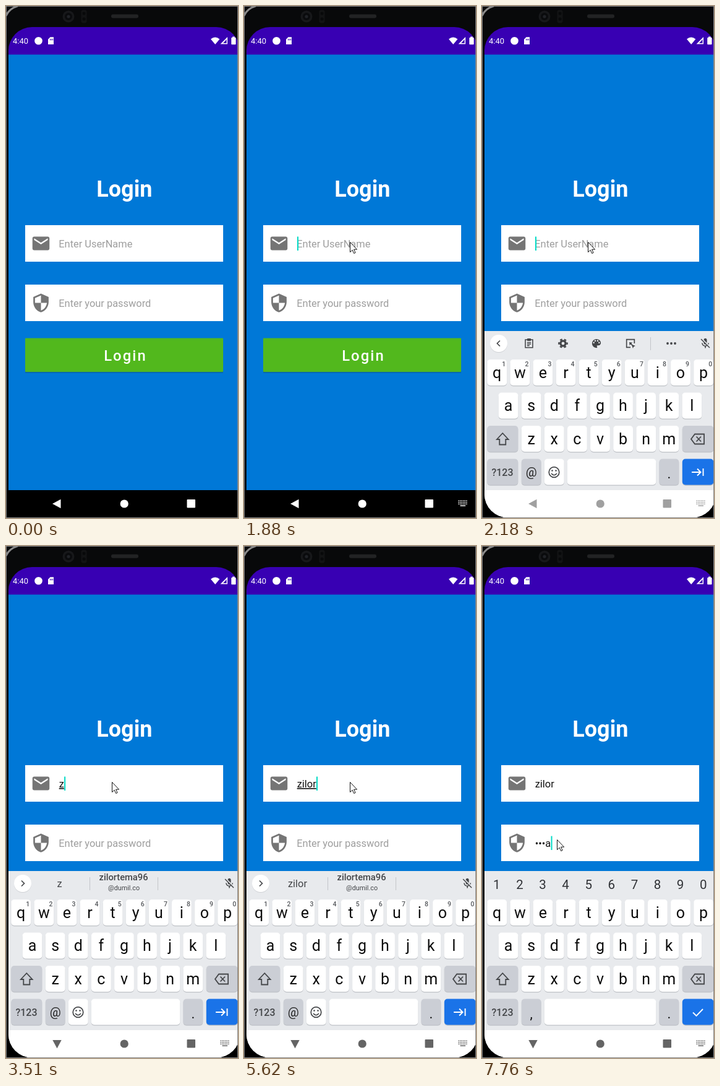
Write an HTML page that moves like this. It is 375 px wide and 827 px high and loops after 8000 ms.

```html
<!DOCTYPE html>
<html lang="en">
<head>
<meta charset="utf-8">
<title>Login screen</title>
<style>
  html, body { margin: 0; width: 100%; height: 100%; overflow: hidden; background: #000; }
  svg { display: block; width: 375px; height: 827px; font-family: Roboto, sans-serif; }
  text { white-space: pre; }
</style>
</head>
<body>
<svg id="stage" viewBox="0 0 375 827" xmlns="http://www.w3.org/2000/svg"></svg>
<script>
const LOOP = 8000;
const INK = '#444649', KEY = '#fff', SOFT = '#cbced5', BLUE = '#1a73e8';

// Markup helpers
const rect = (x, y, w, h, fill, r = 0) =>
  `<rect x="${x}" y="${y}" width="${w}" height="${h}" rx="${r}" fill="${fill}"/>`;
const text = (x, y, size, fill, str, extra = '') =>
  `<text x="${x}" y="${y}" font-size="${size}" fill="${fill}" ${extra}>${str}</text>`;
const mid = (x, y, size, fill, str, extra = '') =>
  text(x, y, size, fill, str, `text-anchor="middle" ${extra}`);
const circle = (x, y, r, fill) => `<circle cx="${x}" cy="${y}" r="${r}" fill="${fill}"/>`;
const line = (d, width = 1.8, color = INK) =>
  `<path d="${d}" fill="none" stroke="${color}" stroke-width="${width}"/>`;
const layer = (id, body) => `<g id="${id}">${body}</g>`;
// 24-unit icon centred on a point
const icon = (cx, cy, size, body) =>
  `<g transform="translate(${cx - size / 2} ${cy - size / 2}) scale(${size / 24})">${body}</g>`;
const shape = (d, fill = INK) => `<path d="${d}" fill="${fill}" fill-rule="evenodd"/>`;

const MAIL = 'M20 4H4C2.9 4 2 4.9 2 6V18C2 19.1 2.9 20 4 20H20C21.1 20 22 19.1 22 18V6C22 4.9 21.1 4 20 4ZM20 8L12 13 4 8V6L12 11 20 6Z';
const SHIELD = 'M12 1L3 5v6c0 5.55 3.84 10.74 9 12 5.16-1.26 9-6.45 9-12V5ZM12 12h7c-.53 4.12-3.28 7.79-7 8.94V12H5V6.3l7-3.11Z';
const MIC_OFF = 'M19 11h-1.7c0 .74-.16 1.43-.43 2.05l1.23 1.23c.56-.98.9-2.09.9-3.28zM14.98 11.17L15 11V5c0-1.66-1.34-3-3-3S9 3.34 9 5v.18zM4.27 3L3 4.27l6.01 6.01V11c0 1.66 1.33 3 2.99 3l.65-.08 1.66 1.66c-.71.33-1.5.52-2.31.52-2.76 0-5.3-2.1-5.3-5.1H5c0 3.41 2.72 6.23 6 6.72V21h2v-3.28c.91-.13 1.77-.45 2.54-.9L19.73 21 21 19.73z';

const icons = {
  search: '<circle cx="9.5" cy="9.5" r="5.5" fill="none" stroke="#444649" stroke-width="2.2"/>' + line('M13.7 13.7L20 20', 2.4),
  sticker: line('M13 20H6Q4 20 4 18V6Q4 4 6 4H18Q20 4 20 6V13ZM13 20V15Q13 13 15 13H20M8 12Q9 15 12 15', 2)
    + circle(9, 8.8, 1.4, INK) + circle(15, 8.8, 1.4, INK),
  clipboard: line('M4.5 4.5H19.5V20.5H4.5ZM8 10H16M8 13.3H16M8 16.6H13', 2) + rect(8, 2, 8, 5, INK, 1.5),
  gear: '<circle cx="12" cy="12" r="5.2" fill="none" stroke="#444649" stroke-width="4.2"/>'
    + '<circle cx="12" cy="12" r="8.4" fill="none" stroke="#444649" stroke-width="3" stroke-dasharray="4.6 4.2" stroke-dashoffset="2.3"/>',
  palette: shape('M12 3C7 3 3 7 3 12S7 21 12 21C14 21 14 19.5 13 18.3 12.3 17 13 16 14.3 16H16C18.8 16 21 13.8 21 11 21 6.6 17 3 12 3Z')
    + [[6.5, 10.5], [9.5, 6.5], [14.5, 6.5], [17.5, 10.5]].map(([x, y]) => circle(x, y, 1.6, '#e8eaed')).join(''),
  resize: line('M12 20H4V4H20V12M10 10L15 15', 2.1) + shape('M10 10H16L10 16ZM14 14L22 17 18.5 18.5 17 22Z'),
};
const strip = list => list.map((name, i) => name === 'gif'
  ? mid(185, 550, 12.5, INK, 'GIF', 'font-weight="900"')
  : icon([76, 131, 185, 240][i], 545, 19, icons[name])).join('');
const rule = x => rect(x, 535, 1, 21, '#c3c5c9');

// Keyboard
const PITCH = 37.1;
const key = (x, y, w, fill = KEY) =>
  rect(x, y + 1.2, w, 42, '#bfc2c7', 5) + rect(x, y, w, 42, fill, 5);
const keyRow = (letters, x0, y) => [...letters].map((c, i) => {
  const x = x0 + i * PITCH;
  return key(x, y, 31.8) + mid(x + 15.9, y + 29.5, 25, '#0c0c0c', c);
}).join('');
const digits = fn => [...'1234567890'].map((d, i) => fn(d, 8.3 + i * PITCH)).join('');

function keyboard() {
  const common = rect(0, 525, 380, 320, '#e8eaed')
    + keyRow('qwertyuiop', 8.3, 571) + keyRow('asdfghjkl', 26.6, 624.5) + keyRow('zxcvbnm', 63.8, 678)
    + key(8.3, 678, 50, SOFT) + line('M33.3 690L24 700H28.3V708.5H38.3V700H42.6Z')
    + key(323.8, 678, 50.5, SOFT) + line('M344 691.5H359V707.5H344L338 699.5ZM346.5 695.5L354 703.5M354 695.5L346.5 703.5')
    + key(8.3, 731.5, 50, SOFT) + mid(33, 758.5, 16, INK, '?123', 'font-weight="500"')
    + key(286.5, 731.5, 31.8, SOFT) + mid(302.4, 763, 22, '#111', '.')
    + key(323.8, 731.5, 50.5, BLUE);
  const textKeys = digits((d, x) => mid(x + 27, 581.5, 10.5, '#55585c', d, 'font-weight="500"'))
    + key(63.8, 731.5, 31.8, SOFT) + mid(79.7, 760, 20, '#222', '@')
    + key(100.9, 731.5, 31.8) + `<circle cx="116.5" cy="753" r="8.3" fill="none" stroke="${INK}" stroke-width="1.7"/>`
    + circle(113.5, 750.5, 1.3, INK) + circle(119.5, 750.5, 1.3, INK) + line('M112 755Q116.5 760.5 121 755', 1.7)
    + key(137.8, 731.5, 143.5)
    + line('M339 753H353M348 747.5L353.5 753 348 758.5M357.5 747V759', 1.9, '#fff')
    + icon(361, 545, 20, shape(MIC_OFF));
  const passKeys = digits((d, x) => mid(x + 15.5, 553.5, 20.5, '#303236', d))
    + key(63.8, 731.5, 31.8, SOFT) + mid(79.7, 763, 22, '#111', ',')
    + key(100.9, 731.5, 180.4)
    + line('M341 753.5L346.5 759 357 748', 1.9, '#fff');
  const chip = rect(13, 532, 28, 28, '#cfd1d5', 14) + circle(27, 545, 14, '#fff');
  const tools = chip + line('M29 540.5L24.5 545 29 549.5', 1.7)
    + layer('toolsA', strip(['search', 'sticker', 'gif', 'clipboard']))
    + layer('toolsB', strip(['clipboard', 'gear', 'palette', 'resize']))
    + rule(272) + [300, 306, 312].map(x => circle(x, 545, 1.9, INK)).join('');
  const hints = chip + line('M25 540.5L29.5 545 25 549.5', 1.7)
    + mid(86.5, 551, 16.4, INK, '', 'id="guess"') + rule(135) + rule(245)
    + mid(190, 540, 14.7, INK, 'zilortema96', 'font-weight="500"')
    + mid(190.5, 556, 10.8, INK, '@dumil.co');
  return common + layer('textKeys', textKeys + layer('tools', tools) + layer('hints', hints)) + layer('passKeys', passKeys);
}

function statusBar() {
  return rect(4, 34, 374, 44.5, '#3800b3') + text(11, 61, 13, '#fff', '4:40')
    + circle(52.5, 56.3, 6.3, '#fff')
    + shape('M71.5 50.3H77V62H68V54ZM71 53V55.5H72V53ZM73 53V55.5H74V53ZM75 53V55.5H76V53Z', '#fff')
    + shape('M331 53.5Q338 47.5 345.3 53.5L338.2 62Z', '#fff')
    + shape('M358 50V61.5H346.5ZM356.5 54L351 60H356.5Z', '#fff')
    + rect(364.2, 51, 7.3, 11.3, '#fff', 1) + rect(366, 49.5, 3.7, 2, '#fff');
}

function field(y, path, id, hint) {
  return rect(31, y, 320, 59, '#fff')
    + icon(56.5, y + 29.5, 33, shape(path, '#757575'))
    + text(85.3, y + 36, 16.4, '#9e9e9e', hint, `id="${id}Hint"`)
    + text(85.7, y + 36, 16.4, '#111', '', `id="${id}Text"`)
    + `<rect id="${id}Caret" y="${y + 18.5}" width="2" height="22.5" fill="#03dac5"/>`;
}

function keypadIcon() {
  let dots = '';
  for (let r = 0; r < 3; r++)
    for (let c = 0; c < 6; c++) dots += `<rect x="${346.5 + c * 2.5}" y="${798.5 + r * 2.6}" width="1.5" height="1.5"/>`;
  return dots + '<rect x="349.5" y="806.5" width="8.5" height="1.5"/>';
}

const stage = document.getElementById('stage');
stage.innerHTML = '<defs><clipPath id="screen"><rect x="4" y="34" width="374" height="792.5" rx="38"/></clipPath></defs>'
  + rect(0, 0, 375, 827, '#000') + rect(0, 0, 375, 76, '#08090a')
  + line('M0 16Q5 4 19 0', 3, '#8b8b8b')
  + circle(101, 17, 9.5, '#17181a') + circle(101, 17, 6, '#0a0b0d') + circle(101, 17, 2.6, '#202227')
  + rect(121.5, 6.5, 9, 21, '#121314', 3) + circle(126, 12, 2.5, '#08090a') + circle(126, 21, 2.5, '#08090a')
  + rect(170, 13.5, 44, 6, '#222324', 3)
  + '<g clip-path="url(#screen)">'
  + rect(4, 78, 374, 704, '#0078d7') + statusBar()
  + mid(191.3, 307.5, 36, '#fff', 'Login', 'font-weight="700"')
  + field(354, MAIL, 'user', 'Enter UserName') + field(450, SHIELD, 'pass', 'Enter your password')
  + rect(31, 538, 320, 55, '#0868ae', 1) + rect(31, 536.5, 320, 54.5, '#52b81d', 1)
  + mid(193, 573, 23.8, '#fff', 'Login', 'font-weight="500" letter-spacing="2.1"')
  + rect(4, 782, 374, 45, '#000') + layer('keys', keyboard())
  + layer('navLight', rect(4, 782, 374, 45, '#fff'))
  + layer('nav', '<path id="back" d="M75 804L88.5 796.8V811.2Z"/><circle cx="191.2" cy="804" r="6.6"/>'
    + '<rect x="292.5" y="797" width="13.5" height="13.5" rx="1"/>' + layer('keypad', keypadIcon()))
  + '</g>'
  + '<rect x=".5" y=".5" width="374" height="826" fill="none" stroke="#858585"/>'
  + '<path id="pointer" d="M.5 .5V16.6L4.2 13.2 6.7 18.6 9.1 17.5 6.6 12.2H11.6Z" fill="#fff" stroke="#111" stroke-linejoin="round"/>';

const el = {};
stage.querySelectorAll('[id]').forEach(n => el[n.id] = n);
const show = (n, on) => { n.style.display = on ? '' : 'none'; };

// Value of the last step reached: [time, value, time, value, ...]
function step(t, track) {
  let v = track[1];
  for (let i = 0; i < track.length; i += 2) if (t >= track[i]) v = track[i + 1];
  return v;
}

const NAME = 'zilor';
const pointerPath = [0, null, 530, [106, 221], 680, [77, 361], 960, [98, 402], 1080, [131, 408], 1200, [159, 387],
  1350, [171, 381], 5870, [169, 386], 6010, [142, 430], 6130, [121, 474]];
const userLength = [0, 0, 3390, 1, 3630, 2, 3780, 3, 4020, 4, 5380, 5];
const guessLength = [0, 0, 3510, 1, 3630, 2, 3900, 3, 4020, 4, 5500, 5];
const userBlink = [0, 0, 1620, 1, 2330, 0, 2870, 1, 3240, 0, 3390, 1, 4580, 0, 4980, 1, 6130, 0, 6440, 1, 6680, 0];
const passValue = [0, '', 7210, 'a', 7330, '•a', 7480, '••a•', 7760, '•••a'];

function setField(id, value, caretOn, dark, underlined) {
  const label = el[id + 'Text'], hint = el[id + 'Hint'], caret = el[id + 'Caret'];
  label.textContent = value;
  label.setAttribute('text-decoration', underlined ? 'underline' : 'none');
  show(hint, !value);
  hint.setAttribute('fill', dark ? '#707070' : '#9e9e9e');
  caret.setAttribute('x', 86 + (value ? label.getComputedTextLength() : 0));
  show(caret, caretOn);
}

function draw(t) {
  const pos = step(t, pointerPath);
  show(el.pointer, pos);
  if (pos) el.pointer.setAttribute('transform', `translate(${pos})`);

  const passMode = t >= 6680;
  setField('user', NAME.slice(0, step(t, userLength)), step(t, userBlink), t >= 1620 && t < 1880, !passMode);
  setField('pass', step(t, passValue), t >= 6560, t >= 6560 && !passMode, false);

  const rising = t < 2180, guess = NAME.slice(0, step(t, guessLength));
  show(el.keys, t >= 2030);
  el.keys.setAttribute('transform', `translate(0 ${rising ? 221 : 0})`);
  el.keys.setAttribute('opacity', rising ? 0.18 : 1);
  show(el.toolsA, rising);
  show(el.toolsB, !rising);
  show(el.textKeys, !passMode);
  show(el.passKeys, passMode);
  show(el.tools, !guess);
  show(el.hints, guess);
  el.guess.textContent = guess;

  show(el.navLight, !rising);
  show(el.keypad, t >= 1880);
  el.nav.setAttribute('fill', step(t, [0, '#fff', 2180, '#a0a0a0', 2330, '#808080', 2450, '#646464']));
  el.back.setAttribute('transform', `rotate(${step(t, [0, 0, 2330, -60, 2450, -90])} 82.5 804)`);
}

function tick() {
  draw(performance.now() % LOOP);
  requestAnimationFrame(tick);
}
tick();
</script>
</body>
</html>
```
